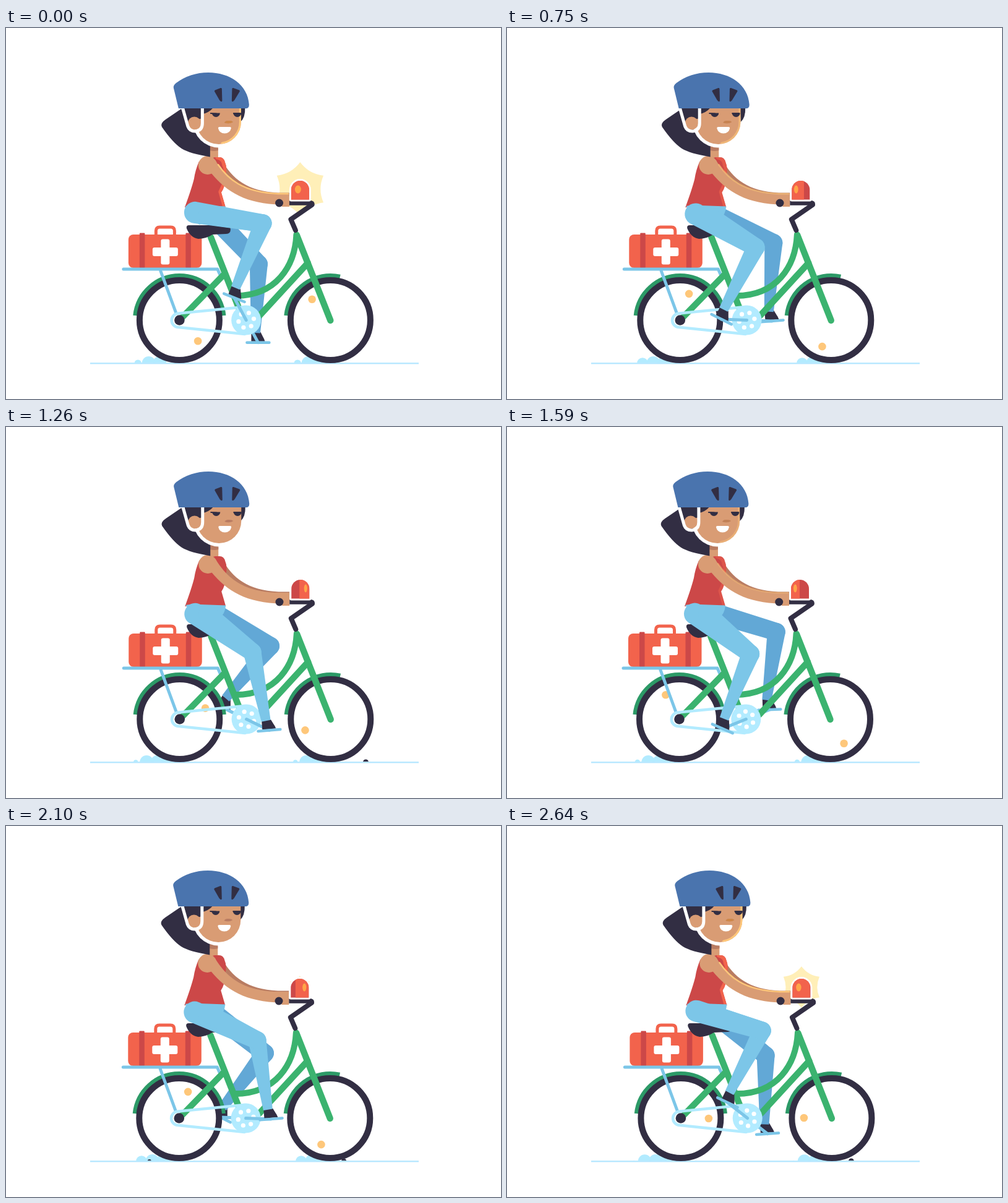
Animation, 800 px wide and 600 px high, one loop 2670 ms. Source, as an HTML page with a canvas:

```html
<!DOCTYPE html>
<html lang="en">
<head>
<meta charset="utf-8">
<title>Paramedic on a bicycle</title>
<style>
html, body { margin: 0; width: 100%; height: 100%; overflow: hidden; background: #fff; }
canvas { display: block; width: 800px; height: 600px; }
</style>
</head>
<body>
<canvas id="stage" width="800" height="600"></canvas>
<script>
const ctx = document.getElementById('stage').getContext('2d');
const LOOP = 2670, CYCLE = 900, STEP = 30, TAU = Math.PI * 2;
const C = {
  dark: '#322e43', green: '#3bb36f', fender: '#2c9a67', blue: '#7cc6e8', deep: '#62a8d6',
  ice: '#b2ebff', red: '#f2634c', wine: '#cc4848', skin: '#d99c74', shade: '#b97c62',
  helmet: '#4a74ae', amber: '#fec77a', glow: '#ffefb8', lamp: '#ffa548', white: '#fff'
};
const rad = deg => deg * Math.PI / 180;
const frac = v => v - Math.floor(v);

// Eased value between [time, value] pairs.
function keys(t, list) {
  if (t <= list[0][0]) return list[0][1];
  for (let i = 1; i < list.length; i++) {
    const [a, u] = list[i - 1], [b, v] = list[i];
    if (t <= b) {
      const k = (t - a) / (b - a);
      return u + (v - u) * k * k * (3 - 2 * k);
    }
  }
  return list[list.length - 1][1];
}

const cache = {};
const path = d => cache[d] || (cache[d] = new Path2D(d));
function fill(d, color) { ctx.fillStyle = color; ctx.fill(path(d)); }
function line(d, color, w, cap = 'round') {
  ctx.strokeStyle = color;
  ctx.lineWidth = w;
  ctx.lineCap = cap;
  ctx.lineJoin = 'round';
  ctx.stroke(path(d));
}
function seg(x1, y1, x2, y2, color, w) {
  ctx.strokeStyle = color;
  ctx.lineWidth = w;
  ctx.lineCap = 'round';
  ctx.beginPath();
  ctx.moveTo(x1, y1);
  ctx.lineTo(x2, y2);
  ctx.stroke();
}
function disc(x, y, rx, color, ry = rx) {
  ctx.fillStyle = color;
  ctx.beginPath();
  ctx.ellipse(x, y, Math.max(0, rx), Math.max(0, ry), 0, 0, TAU);
  ctx.fill();
}
function box(x, y, w, h, r, color) {
  ctx.fillStyle = color;
  ctx.beginPath();
  ctx.roundRect(x, y, w, h, r);
  ctx.fill();
}
function shifted(x, y, draw, turn = 0) {
  ctx.save();
  ctx.translate(x, y);
  ctx.rotate(turn);
  draw();
  ctx.restore();
}

// Tapered limb segment between two circles.
function taper(ax, ay, ra, bx, by, rb, roundEnd) {
  const dir = Math.atan2(by - ay, bx - ax);
  const k = Math.acos((ra - rb) / Math.hypot(bx - ax, by - ay));
  ctx.beginPath();
  ctx.arc(ax, ay, ra, dir + k, dir - k);
  if (roundEnd) ctx.arc(bx, by, rb, dir - k, dir + k);
  else {
    ctx.lineTo(bx + rb * Math.cos(dir - k), by + rb * Math.sin(dir - k));
    ctx.lineTo(bx + rb * Math.cos(dir + k), by + rb * Math.sin(dir + k));
  }
  ctx.closePath();
  ctx.fill();
}

function ground(t) {
  const half = t / 450;
  ctx.save();
  ctx.beginPath();
  ctx.rect(136, 500, 531, 41.5);
  ctx.clip();
  for (const start of [265, 523]) {
    for (let i = 0; i < 4; i++) {
      const x = start - 70 * frac(half + 0.24 + i / 4);
      const r = 11 * Math.min(1, Math.max(0, (x - start + 62) / 20));
      disc(x, 542, r, C.ice);
    }
  }
  // Pebbles: entry time and radius.
  for (const [enter, r] of [[46, 3], [844, 4], [1168, 4.5], [1632, 3], [1970, 4], [2521, 4.5]]) {
    disc(667 - 0.93 * ((t - enter + LOOP) % LOOP), 542, r, C.dark);
  }
  ctx.restore();
  line('M136 542.3H667', '#b2e6ff', 2.2, 'butt');
}

function flare(p) {
  const u = ((p - 770 + CYCLE) % CYCLE) / 450;
  if (u <= 0 || u >= 1) return;
  const R = 49 * Math.sqrt(Math.sin(Math.PI * u));
  const at = (i, r) => [475.5 + r * Math.sin(i * Math.PI / 6), 260.5 - r * Math.cos(i * Math.PI / 6)];
  ctx.beginPath();
  ctx.moveTo(...at(0, R));
  for (let i = 1; i < 12; i += 2) ctx.quadraticCurveTo(...at(i, R * 0.65), ...at(i + 1, R));
  ctx.fillStyle = C.glow;
  ctx.fill();
}

function siren(p) {
  const dome = 'M461 277.5V261.5A14.5 14.5 0 0 1 490 261.5V277.5Z';
  const q = (p + 360) % CYCLE;
  line(dome, C.white, 6);
  fill(dome, C.wine);
  ctx.save();
  ctx.clip(path(dome));
  const left = 461 + 29 * Math.max(0, (q - 575) / 325);
  const right = 461 + 29 * Math.min(1, q / 310);
  ctx.fillStyle = C.red;
  ctx.fillRect(left, 245, right - left, 35);
  const x = keys(q, [[0, -8.5], [210, -7.5], [300, -4.5], [360, -3.5], [450, 0], [720, 8.5], [900, 9]]);
  const w = keys(q, [[0, 1], [210, 3.4], [300, 4.2], [360, 5], [450, 6.5], [720, 2.6], [900, 1]]);
  disc(475.5 + x, 261, w, C.lamp, 6.5);
  if (q < 60) disc(483, 261, 1, C.lamp, 6);
  ctx.restore();
}

function crankPoint(theta) {
  const tilt = rad(11) + rad(16) * Math.cos(theta - rad(195));
  return { x: 388.3 + 41 * Math.cos(theta), y: 472.5 + 41 * Math.sin(theta), tilt };
}

// Two-joint leg; the hip rises with its pedal. Returns the knee.
function leg(theta, hipX, hipR, color, thigh, shin) {
  const pedal = crankPoint(theta);
  const c = Math.cos(pedal.tilt), s = Math.sin(pedal.tilt);
  const hipY = 301 + 3 * Math.sin(theta);
  const ax = pedal.x - 4 * c + 16 * s, ay = pedal.y - 4 * s - 16 * c;
  const dx = ax - hipX, dy = ay - hipY;
  const d = Math.min(Math.hypot(dx, dy), thigh + shin - 0.5);
  const bend = Math.acos((thigh * thigh + d * d - shin * shin) / (2 * thigh * d));
  const a = Math.atan2(dy, dx) - bend;
  const kx = hipX + thigh * Math.cos(a), ky = hipY + thigh * Math.sin(a);
  shifted(pedal.x, pedal.y, () => fill('M-11 -2L-11 -17L4 -17L8 -9Q10 -6 11 -2Z', C.dark), pedal.tilt);
  ctx.fillStyle = color;
  taper(hipX, hipY, hipR, kx, ky, 14.5, true);
  taper(kx, ky, 14.5, ax, ay, 7.5, false);
  shifted(pedal.x, pedal.y, () => seg(-18, 0, 18, 0, C.blue, 4.5), pedal.tilt);
  return [kx, ky];
}

function wheel(x, angle) {
  disc(x, 472.5, 64.5, C.white);
  ctx.strokeStyle = C.dark;
  ctx.lineWidth = 10;
  ctx.beginPath();
  ctx.arc(x, 472.5, 64.5, 0, TAU);
  ctx.stroke();
  disc(x + 45 * Math.cos(angle), 472.5 + 45 * Math.sin(angle), 6.3, C.amber);
}

function kit() {
  line('M242.5 337V328Q242.5 322 248.5 322H266.5Q272.5 322 272.5 328V337', C.red, 5, 'butt');
  box(198, 334, 118.5, 54, 8, C.red);
  for (const x of [216, 290.5]) box(x, 331.5, 8.5, 56.5, 1, C.wine);
  box(250.5, 341.5, 14, 41, 3, C.white);
  box(237, 355, 41, 14, 3, C.white);
  line('M190 390H342L346 399M250 393L275 461', C.blue, 5);
}

function bike() {
  line('M283 470L352 399M331 338L376 452M488 380L410 465', C.green, 10.3);
  line('M469.5 334C467 385 437 434 369 433', C.green, 9.8);
  line('M470 335L524.5 473', C.green, 10.3);
}

function drive(theta) {
  line('M279 461.5L386 451M279 484L386 495M279 461.5A11.2 11.2 0 0 0 279 484', C.ice, 4.5);
  disc(388.3, 472.5, 24, C.ice);
  for (let i = 0; i < 6; i++) {
    const a = theta + rad(48 + 60 * i);
    disc(388.3 + 12.5 * Math.cos(a), 472.5 + 12.5 * Math.sin(a), 3.6, C.white);
  }
  disc(280.5, 472.5, 8.3, C.dark);
  const p = crankPoint(theta);
  seg(388.3, 472.5, p.x, p.y, C.blue, 5);
}

function torso(rim) {
  fill('M329 186H343V214H329Z', C.skin);
  fill('M329 190H343V198Q336 200 329 198Z', C.shade);
  fill('M349 214C366 244 390 264 440 266.5H458V272L372 266L340 225Z', C.shade);
  const shirt = 'M312 216L338 209H345Q352 209 354 217Q358 226 355 240Q354 258 348 266L355 290H289Q300 260 304 244Q306 230 312 216Z';
  fill(shirt, C.wine);
  ctx.save();
  ctx.clip(path(shirt));
  ctx.globalAlpha = rim;
  line('M342 209Q352 211 353 222Q357 228 354 250L347 265L354 290', C.red, 7);
  ctx.restore();
}

function arm(rim) {
  disc(326, 222, 15, C.skin);
  fill('M338 213C352 236 376 267 440 268H458V289H446V285.5C388 285 357 265 332 235Z', C.skin);
  ctx.globalAlpha = rim;
  line('M343 221C358 243 382 266 440 268L456 268', C.amber, 2.4);
  ctx.globalAlpha = 1;
}

function head(p, rim) {
  const turn = keys(p, [[0, 0], [90, -0.6], [200, 0], [360, 0], [500, -5], [745, -5], [840, 0]]);
  const slide = keys(p, [[0, 0], [90, -1.5], [300, 0], [360, 0], [540, -0.6], [750, -0.6], [840, 0]]);
  const open = keys(p, [[20, 1], [90, 0.5], [140, 0.4], [230, 1]]);
  const half = turn / 2;
  shifted(slide, 0, () => {
    fill('M283 131L258 148Q249 154 252 160Q270 186 284 195Q297 203 330 208.5V176L300 140Z', C.dark);
    ctx.save();
    ctx.beginPath();
    ctx.rect(280, 150, 74, 50);
    ctx.clip();
    disc(344 + half / 2, 152, 41.5, C.white);
    ctx.restore();
    fill('M378 129H386.5Q387 145 379 152Z', C.dark);
    shifted(half / 2, 0, () => {
      const face = 'M308 128H380V152A36 36 0 0 1 308 152Z';
      fill(face, C.skin);
      ctx.save();
      ctx.clip(path(face));
      ctx.globalAlpha = rim;
      line('M379.5 129V152A35.5 35.5 0 0 1 350 187', C.amber, 5);
      ctx.restore();
    });
    shifted(half, 0, () => {
      const h = 6.5 * open, y = 144 - h;
      ctx.fillStyle = C.dark;
      for (const x of [339.5, 374]) {
        ctx.beginPath();
        ctx.ellipse(x, y, 6.5, h, 0, 0, Math.PI);
        ctx.fill();
      }
      shifted(0, y - 137.5, () => line('M331 138L340 138.5M368 138H379', C.dark, 2));
      const nose = 'M353 153Q355 150 358 150H361Q365 150 367 152Q361 156 353 153Z';
      fill(nose, C.shade);
      ctx.globalAlpha = rim;
      fill(nose, '#cf8848');
      ctx.globalAlpha = 1;
      fill('M345 160H362Q364 160 364 162Q362 170.5 353.5 170.5Q345 170.5 343 162Q343 160 345 160Z', C.white);
    });
    shifted(turn, 0, () => {
      fill('M288 129H335Q328 137 318 139V146L300 150L290 142Z', C.dark);
      disc(304.5, 154, 10.5, C.skin);
      line('M285.5 129L294 159Q297 167 306 167Q317.5 166 317.5 154V129', C.white, 5, 'butt');
    });
    fill('M279 130L271 97Q270 93 275 89Q298 72 327 72C362 72 391 92 393 124Q393 130 388 130Z', C.helmet);
    shifted(turn * 0.85, 0, () => {
      for (const d of ['M338.5 102L347.5 98.5L348 117.5L346.5 116Z', 'M376.5 102L367 98.5L366.5 117.5L368 116Z']) {
        fill(d, C.dark);
        line(d, C.dark, 3);
      }
    });
  });
}

function draw(t) {
  const p = t % CYCLE;
  const theta = rad(242) + TAU * p / CYCLE;
  const spin = rad(48.6) + TAU * t / 450;
  const dx = -1.2 + 1.6 * Math.cos(TAU * (t - 390) / 450);
  const rim = keys((p + 360) % CYCLE, [[60, 0], [200, 0.6], [290, 1], [500, 1], [660, 0]]);
  ctx.fillStyle = C.white;
  ctx.fillRect(0, 0, 800, 600);
  ground(t);
  shifted(dx, 0, () => {
    flare(p);
    const far = crankPoint(theta + Math.PI);
    leg(theta + Math.PI, 334, 16, C.deep, 108, 111);
    seg(388.3, 472.5, far.x, far.y, C.blue, 5);
    line('M208.9 465A72 72 0 0 1 352.1 465', C.fender, 7, 'butt');
    line('M452.9 465A72 72 0 0 1 540 402.2', C.fender, 7, 'butt');
    wheel(280.5, spin);
    wheel(524.5, spin + Math.PI);
    kit();
    bike();
    drive(theta);
    fill('M296 319H357Q363 319 363 326Q363 333 356 333L334 334Q323 341 311 341Q298 339 292 324Q291 319 296 319Z', C.dark);
    torso(rim);
    fill('M290 288L300 286.5L355 288.5Q354 303 343 311L312 318Z', C.blue);
    const knee = leg(theta, 305.5, 17.5, C.blue, 111, 113);
    ctx.fillStyle = C.blue;
    taper(326, 303, 15, ...knee, 14.5, true);
    arm(rim);
    head(p, rim);
    line('M468 327L460.5 309.5L494.5 286', C.dark, 8);
    line('M458 283H494', C.dark, 7.5, 'butt');
    disc(493.5, 284.5, 5.2, C.dark);
    disc(441.7, 283, 6.5, C.dark);
    siren(p);
  });
}

const began = performance.now();
function tick() {
  const t = (performance.now() - began) % LOOP;
  draw(Math.floor(t / STEP) * STEP);
  requestAnimationFrame(tick);
}
tick();
</script>
</body>
</html>
```
